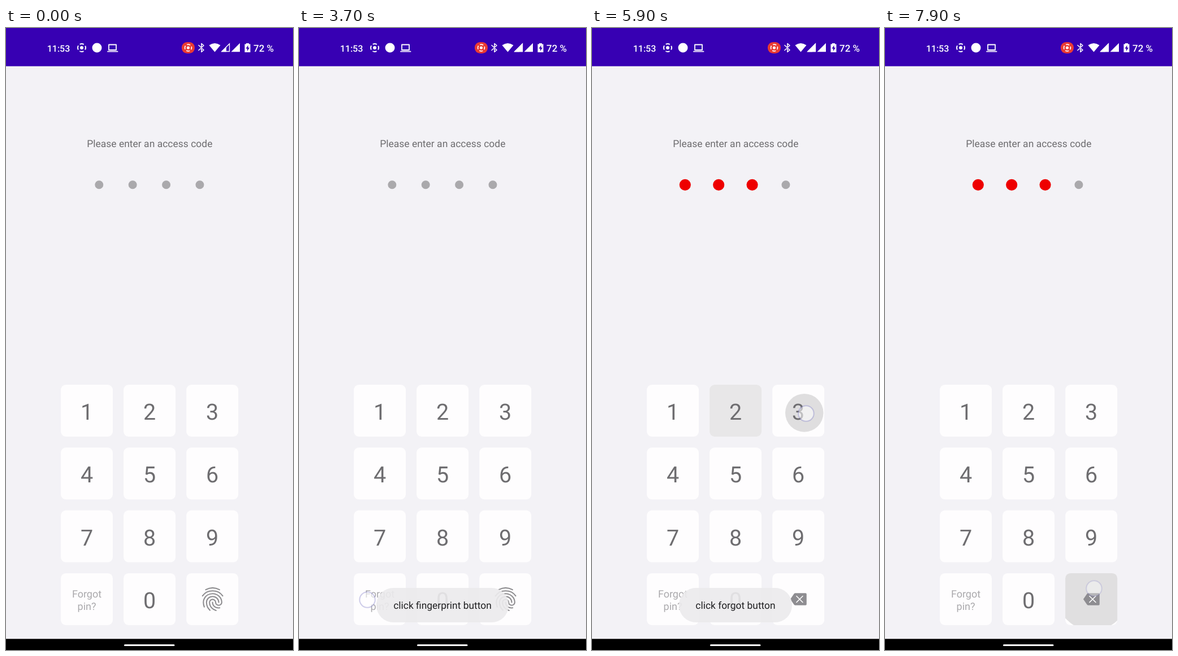
An HTML page for the animation above (8000 ms loop, 508 by 1102 pixels).

```html
<!DOCTYPE html>
<html lang="en">
<head>
<meta charset="utf-8">
<title>Access code</title>
<style>
  html, body { margin: 0; width: 100%; height: 100%; overflow: hidden; background: #f3f2f6; }
  svg { display: block; width: 508px; height: 1102px; font-family: Roboto, sans-serif; }
  text { text-anchor: middle; text-rendering: geometricPrecision; }
  .line { fill: none; stroke-linecap: round; stroke-linejoin: round; }
  .digit { font-size: 39.5px; fill: #6e6d70; }
  .hint { font-size: 18px; fill: #aaa9ac; }
</style>
</head>
<body>
<svg viewBox="0 0 508 1102">
  <defs>
    <g id="record">
      <circle r="3"/>
      <circle r="7" fill="none" stroke="#fff" stroke-width="2" stroke-dasharray="7.4 3.6" stroke-dashoffset="3.7"/>
    </g>
  </defs>
  <rect width="508" height="1102" fill="#f3f2f6"/>
  <rect width="508" height="67.7" fill="#3700b3"/>

  <g fill="#fff" font-weight="500">
    <text x="93" y="41.7" font-size="16">11:53</text>
    <use href="#record" x="134" y="35"/>
    <circle cx="161" cy="35" r="8.5"/>
    <path class="line" stroke="#fff" stroke-width="1.8" d="M182 39V29.5h13V39ZM180 41.7h17.5"/>
    <rect x="311" y="25" width="23" height="20" rx="9.5" fill="#ea3a33"/>
    <use href="#record" transform="translate(322.5 35) scale(.85)"/>
    <path class="line" stroke="#fff" stroke-width="1.6" d="M341 30.5 350 39 346 42.5V27.5L350 31 341 39.5"/>
    <path d="M359.5 30.5Q369.5 23.5 379.5 30.5L369.5 42.5Z"/>
    <path d="M382 41.5 395.5 28V41.5Z" fill="none" stroke="#fff" stroke-width="1.4"/>
    <path d="M381 42.2 390 33.2V42.2Z"/>
    <path id="strong" d="M380.5 42.2 396 26.7V42.2Z"/>
    <path d="M398.5 42.2 414 26.7V42.2Z"/>
    <path d="M425 28.5V27h5v1.5h2.5V43h-10V28.5Z"/>
    <path d="M428.5 30.5 424.5 36.5H427V41L431 34.8H428.5Z" fill="#3700b3"/>
    <text x="456" y="41.7" font-size="17">72 %</text>
  </g>

  <text x="254.3" y="211" font-size="17.5" fill="#6e6d70">Please enter an access code</text>
  <g id="dots"></g>
  <g id="cards"></g>
  <g id="ripples"></g>
  <g id="labels"></g>

  <g id="finger" class="line" stroke="#8e8d90" transform="translate(340.5 986.8) scale(2.1)">
    <path d="M6.2 4C9.8 2 14.2 2 17.8 4M3.5 9.2C7.4 3.6 16.6 3.6 20.5 9.2"/>
    <path d="M9.75 21.3C8.9 20.4 8.4 19.9 7.8 18.75 7.2 17.6 6.84 16.2 6.84 14.66 6.84 11.96 9.15 9.77 12 9.77S17.16 11.96 17.16 14.66"/>
    <path d="M17.96 19.3C16.4 19.5 15.2 19.3 14.1 18.6 12.75 17.7 11.94 16.2 11.94 14.66"/>
    <path d="M14.9 21.5C13.4 21.1 12.4 20.5 11.4 19.5 10.1 18.2 9.4 16.5 9.4 14.66 9.4 13.3 10.55 12.2 11.97 12.2S14.55 13.3 14.55 14.66 15.7 17.1 17.13 17.1 19.7 16 19.7 14.66C19.7 10.6 16.2 7.35 11.96 7.35 8.9 7.35 6.1 9.05 4.9 11.67 4.2 13.1 3.9 15.5 4.95 18.5"/>
  </g>
  <g id="erase">
    <path d="M351 1012 357.5 1002.5Q358.5 1001.3 360 1001.3H378Q379.8 1001.3 379.8 1003V1021Q379.8 1022.8 378 1022.8H360Q358.5 1022.8 357.5 1021.5Z" fill="#8e8d91"/>
    <path class="line" stroke="#fff" stroke-width="1.6" d="M362 1006.5 373 1017.5M373 1006.5 362 1017.5"/>
  </g>

  <g id="toasts"></g>
  <g id="touches"></g>

  <rect y="1082.3" width="508" height="20"/>
  <rect x="209" y="1092" width="89.5" height="3" rx="1.5" fill="#fff"/>
</svg>
<script>
const $ = id => document.getElementById(id);
const clamp = v => Math.max(0, Math.min(1, v));
const mix = (a, b, k) => a + (b - a) * k;

function add(parent, tag, attrs, label = '') {
  const el = document.createElementNS('http://www.w3.org/2000/svg', tag);
  for (const name in attrs) el.setAttribute(name, attrs[name]);
  el.textContent = label;
  return parent.appendChild(el);
}

const LOOP = 8000, STEP = 100, FORGOT = 9, ACTION = 11;
const keyX = k => 143 + (k % 3) * 111.1;
const keyY = k => 678 + Math.floor(k / 3) * 111.3;

const dots = [0, 1, 2, 3].map(i => add($('dots'), 'circle', { cx: 164.8 + i * 59.4, cy: 277.8 }));

[...'123456789', '', '0', ''].forEach((label, k) => {
  const x = keyX(k), y = keyY(k);
  const box = { x: x - 46, y: y - 46, width: 92, height: 92, rx: 9 };
  add($('cards'), 'rect', { ...box, fill: '#fefdfe' });
  add($('labels'), 'text', { class: 'digit', x, y: y + 16 }, label);
  add(add($('cards'), 'clipPath', { id: 'clip' + k }), 'rect', box);
});
add($('labels'), 'text', { class: 'hint', x: 143, y: 1009 }, 'Forgot');
add($('labels'), 'text', { class: 'hint', x: 143, y: 1030.5 }, 'pin?');

// Each tap: start time, key index, touch point
const taps = [
  [1590, ACTION, 368, 1010], [3690, FORGOT, 121, 1013],
  [5390, 0, 154, 692], [5620, 1, 262, 686], [5840, 2, 379, 683],
  [6300, 3, 161, 782], [6490, 4, 289, 781], [6660, 5, 388, 783],
  [7750, ACTION, 370, 993]
].map(([start, key, x, y]) => ({
  start, key, x, y,
  ripple: add(add($('ripples'), 'g', { 'clip-path': `url(#clip${key})` }), 'circle', {}),
  touch: add($('touches'), 'circle', {
    cx: x, cy: y, r: 13.7, fill: 'rgba(255,255,255,.57)',
    stroke: 'rgba(110,105,190,.33)', 'stroke-width': 2
  })
}));

const toasts = [
  ['click fingerprint button', 234, 1900, 3900],
  ['click forgot button', 200, 4100, 6200]
].map(([label, width, show, hide]) => {
  const el = add($('toasts'), 'g', {});
  add(el, 'rect', { x: 254 - width / 2, y: 992, width, height: 61, rx: 30, fill: '#ecebed', 'fill-opacity': .91 });
  add(el, 'text', { x: 254, y: 1029.4, 'font-size': 17.4, fill: '#202022' }, label);
  return { el, show, hide };
});

function draw(t) {
  let count = 0;
  for (const { start, key, x, y, ripple, touch } of taps) {
    const age = t - start;
    if (age >= 50 && key < FORGOT) count = Math.min(4, count + 1);
    if (age >= 50 && key === ACTION) count = Math.max(0, count - 1);

    const drift = clamp(age / 260);
    ripple.setAttribute('cx', mix(x, keyX(key), drift));
    ripple.setAttribute('cy', mix(y, keyY(key), drift));
    ripple.setAttribute('r', Math.max(0, 14 + age * .33));
    ripple.setAttribute('opacity', age < 30 ? 0 : .122 * (1 - clamp(age / 420) ** 3));
    touch.setAttribute('opacity', age < 0 ? 0 : 1 - clamp((age - 90) / 160));
  }

  dots.forEach((dot, i) => {
    dot.setAttribute('r', i < count ? 10.1 : 7.5);
    dot.setAttribute('fill', i < count ? '#ee0000' : '#aaa9ac');
  });
  $('finger').setAttribute('opacity', count ? 0 : 1);
  $('erase').setAttribute('opacity', count ? 1 : 0);
  $('strong').setAttribute('opacity', t < 500 ? 0 : 1);

  for (const { el, show, hide } of toasts) {
    el.setAttribute('opacity', clamp((t - show) / 250) * (1 - clamp((t - hide) / 200)));
  }
}

const origin = performance.now();
function tick() {
  const t = (performance.now() - origin) % LOOP;
  draw(Math.floor(t / STEP) * STEP);
  requestAnimationFrame(tick);
}
tick();
</script>
</body>
</html>
```
